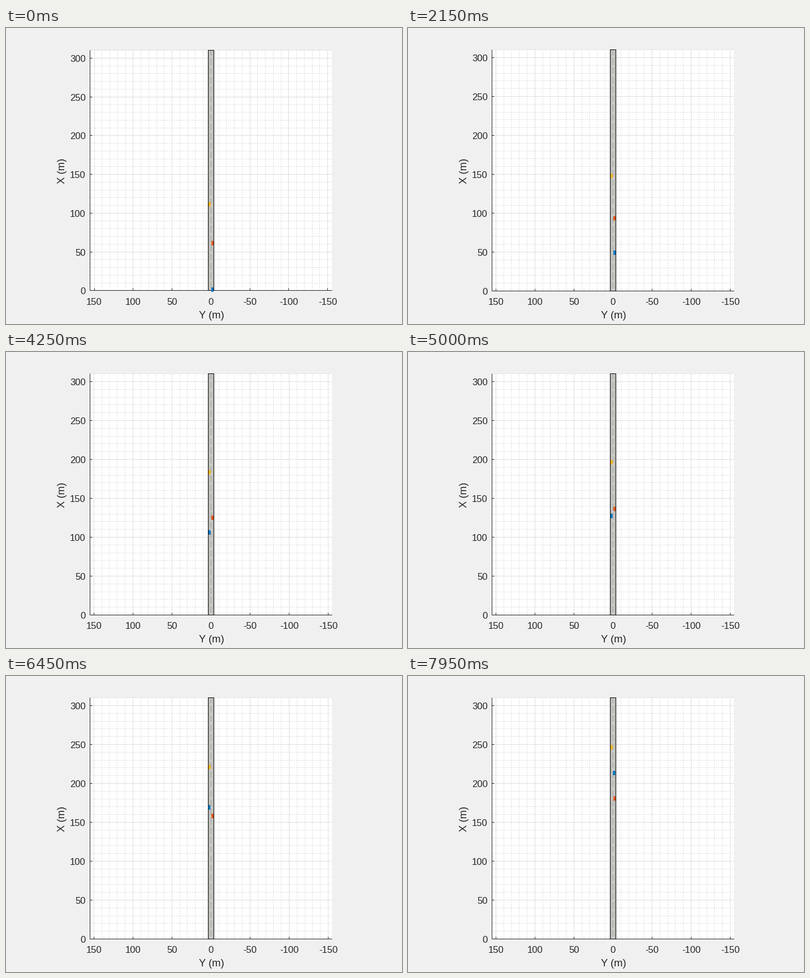
Recreate the animation shown at these times as a matplotlib script. Size 700 by 525 pixels, loop 8000 ms.

```python
import math
import numpy as np
import matplotlib.pyplot as plt
from matplotlib.animation import FuncAnimation
from matplotlib.collections import LineCollection
from matplotlib.patches import Rectangle

W, H, DPI = 700, 525, 100
FRAMES, STEP = 160, 50
PX = 72 / DPI                      # points per pixel
MID = 362.4                        # pixel column of Y = 0
INK = "#262626"
CAR_LEN, CAR_WID, CAR_MID = 4.7, 1.8, 1.35
LANE = 1.8

plt.rcParams["font.family"] = "Liberation Sans"
fig = plt.figure(figsize=(W / DPI, H / DPI), dpi=DPI, facecolor="#f0f0f0")
ax = fig.add_axes([0, 0, 1, 1])
ax.set_xlim(0, W)
ax.set_ylim(H, 0)
ax.axis("off")


def label(x, y, text, px, **kw):
    return ax.text(x, y, text, fontsize=px * PX, color=INK, **kw)


class Scene:
    """Axes, grid and road for one scale; metres to pixels.

    Fixed lines sit on whole pixels; the renderer centres them there.
    """

    def __init__(self, scale, base):
        self.scale, self.base = scale, base
        self.parts = []
        self.top = math.floor(base - 310 * scale)
        self.left, self.right = 148, 576
        self.bottom = math.floor(base)
        self.grid()
        self.rulers()
        self.road()

    def px(self, y):
        return MID - y * self.scale

    def py(self, x):
        return self.base - x * self.scale

    def lines(self, segs, color, width, z, **kw):
        self.parts.append(ax.add_collection(LineCollection(
            segs, colors=color, linewidths=width * PX, zorder=z, **kw)))

    def rect(self, x0, y0, x1, y1, z, **kw):
        self.parts.append(ax.add_patch(
            Rectangle((x0, y0), x1 - x0, y1 - y0, zorder=z, **kw)))

    def col(self, y):
        x = math.floor(self.px(y))
        return [(x, self.bottom), (x, self.top)]

    def row(self, x):
        y = math.floor(self.py(x))
        return [(self.left, y), (self.right, y)]

    def grid(self):
        self.rect(self.left, self.top + 1, self.right, self.bottom, 0,
                  fc="white", ec="none")
        minor = [self.col(y) for y in range(-150, 151, 10) if y % 50]
        minor += [self.row(x) for x in range(0, 311, 10) if x % 50]
        self.lines(minor, "#d8d8d8", 1, 1,
                   linestyles=[(0, (2, 2))], capstyle="butt")
        major = [self.col(y) for y in range(-150, 151, 50)]
        major += [self.row(x) for x in range(50, 301, 50)]
        self.lines(major, "#dedede", 1, 1.1, capstyle="butt")

    def rulers(self):
        segs = [[(self.left, self.top), (self.left, self.bottom)],
                [(self.left, self.bottom), (self.right, self.bottom)]]
        for y in range(-150, 151, 50):
            x = math.floor(self.px(y))
            segs.append([(x, self.bottom), (x, self.bottom - 4)])
            self.parts.append(label(self.px(y), 491, str(y), 16.67,
                                    ha="center", va="baseline"))
        for x in range(0, 301, 50):
            y = math.floor(self.py(x))
            segs.append([(self.left, y), (self.left + 4, y)])
            self.parts.append(label(141, y + 7, str(x), 16.67,
                                    ha="right", va="baseline"))
        self.lines(segs, INK, 1, 1.5)

    def road(self):
        x0 = math.floor(self.px(2 * LANE))
        x1 = math.floor(self.px(-2 * LANE))
        self.rect(x0, self.top, x1, self.bottom, 2, fc="#cdcdc8", ec="none")
        rungs = range(self.top + 2, self.bottom, 2)
        self.lines([[(x0, y), (x1, y)] for y in rungs], "#aeaeaa", 1, 2.1)
        mid = math.floor(MID)
        dashes = [[(mid, self.py(x)), (mid, self.py(x + 3))]
                  for x in range(0, 310, 12)]
        self.lines(dashes, "#fafafa", 1, 2.2, capstyle="butt")
        self.rect(x0, self.top, x1, self.bottom, 2.3,
                  fill=False, ec="black", lw=PX)

    def show(self, on):
        for part in self.parts:
            part.set_visible(on)


first = Scene(1.3755, 465.9)       # the view settles after one frame
rest = Scene(1.3805, 466.6)
label(363, 515, "Y (m)", 18.33, ha="center", va="baseline")
label(108, 253, "X (m)", 18.33, rotation=90, ha="right", va="center")


def make_car(color):
    return ax.add_patch(Rectangle((0, 0), 1, 1, fc=color, ec=color,
                                  lw=1.4 * PX, joinstyle="miter",
                                  snap=False, zorder=3))


cars = [make_car(c) for c in ("#0072bd", "#d95319", "#edb120")]

# Speed of the overtaking car in m/s at a few times, joined by straight lines
KNOT_T = [0, 0.8, 1.7, 2.55, 4.25, 5.7, 6.45, 7.95]
KNOT_V = [17, 22, 24.7, 26.6, 28.1, 28.7, 29.2, 29.8]
fine_t = np.linspace(0, 8, 1601)
fine_v = np.interp(fine_t, KNOT_T, KNOT_V)
fine_x = np.concatenate(
    ([0], np.cumsum((fine_v[1:] + fine_v[:-1]) / 2 * np.diff(fine_t))))


def ease(t, a, b):
    u = min(max((t - a) / (b - a), 0), 1)
    return u * u * (3 - 2 * u)


def overtaker(t):
    x = float(np.interp(t, fine_t, fine_x))
    out, back = ease(t, 2.6, 4.2), ease(t, 6.8, 8.25)
    drift = 0.4 * math.sin(math.pi * ease(t, 4.3, 7.3))
    return x, -LANE + 2 * LANE * (out - back) + drift


def draw(i):
    t = i * STEP / 1000
    first.show(i == 0)
    rest.show(i > 0)
    view = rest if i else first
    spots = [overtaker(t), (60 + 15 * t, -LANE), (110 + 17 * t, LANE)]
    w, h = CAR_WID * view.scale, CAR_LEN * view.scale
    for car, (x, y) in zip(cars, spots):
        car.set_bounds(view.px(y) - w / 2,
                       view.py(x + CAR_MID) - h / 2, w, h)
    return cars


anim = FuncAnimation(fig, draw, frames=FRAMES, interval=STEP,
                     init_func=lambda: draw(0), repeat=True, repeat_delay=0)
plt.show()
```
